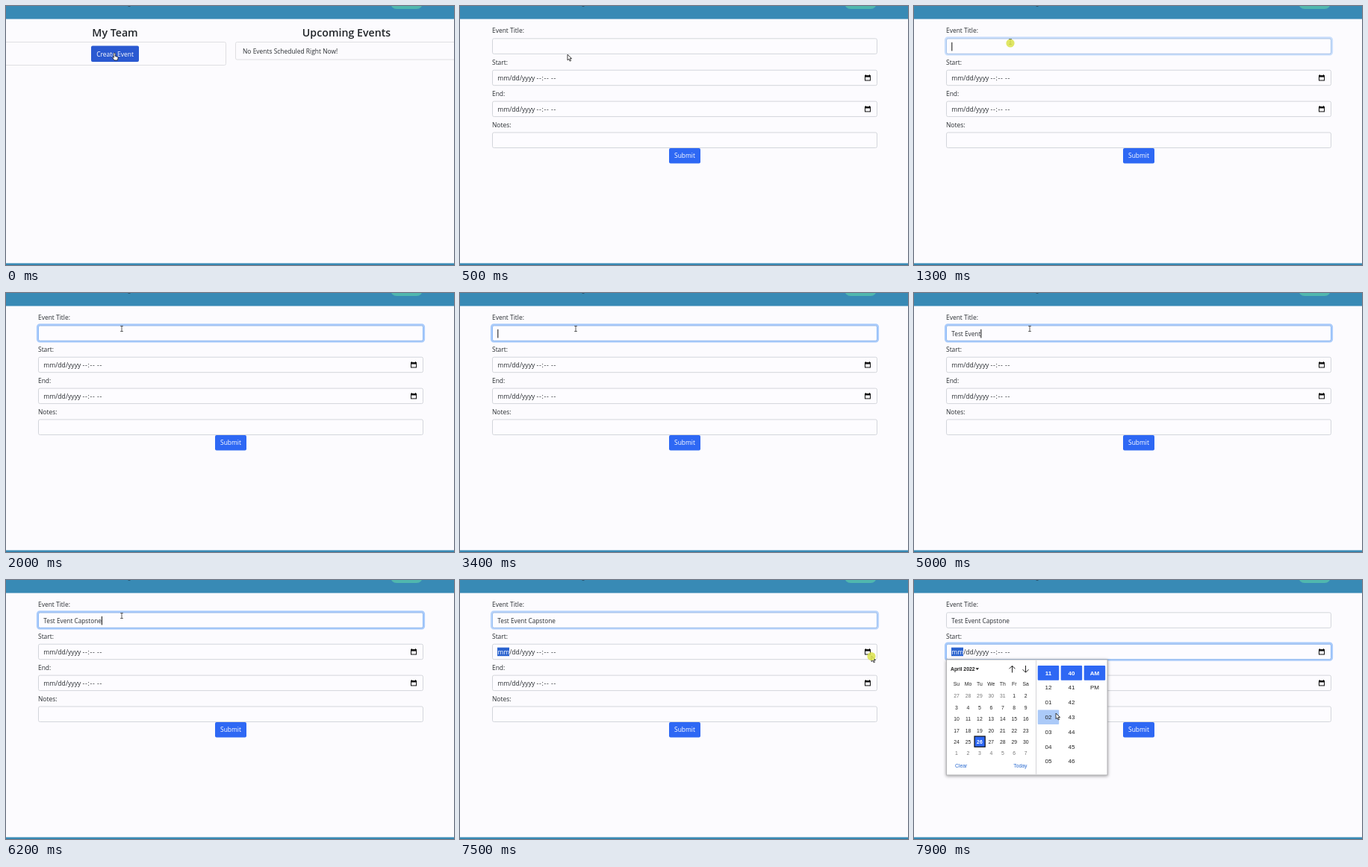
Recreate the animation shown at these times as an HTML page. Size 600 px wide and 348 px high, loop 8 s.

```html
<!DOCTYPE html>
<html lang="en">
<head>
<meta charset="utf-8">
<title>Create event</title>
<style>
  html, body { margin: 0; width: 100%; height: 100%; overflow: hidden; background: #fcfbfe; }
  svg { display: block; }
  text { font: 8.45px "Open Sans", "Noto Sans", sans-serif; fill: #2b2f33; white-space: pre; }
  .heading { font-size: 14.2px; font-weight: 600; fill: #212529; }
  .value { font-size: 8.28px; }
  .date { font-size: 8.6px; }
  .picker text { font: 6.8px "Liberation Sans", Arial, sans-serif; fill: #222; }
  .picker .time { font-size: 8px; }
  .picker .bold { font-weight: 700; }
  .picker .dim { fill: #777; }
  .picker .link { fill: #2a6bd0; }
  .picker .white, .white { fill: #fff; }
</style>
</head>
<body>
<svg id="stage" width="600" height="348" viewBox="0 0 600 348"></svg>
<script>
const LOOP = 8000, STEP = 100;
const TITLE = 'Test Event Capstone';
// Moment each character is typed, in tenths of a second
const KEYS = [40, 41, 43, 44, 45, 46, 47, 49, 49, 50, 52, 53, 55, 56, 57, 58, 60, 61, 62];
// Pointer path: time, x, y
const PATH = [[0, 146, 67], [400, 146, 67], [900, 136, 58], [1300, 129, 48], [1400, 129, 48],
  [1700, 155, 48], [6400, 155, 48], [6900, 400, 112], [7300, 551, 102], [7600, 551, 102],
  [7900, 190, 179], [8000, 190, 179]];
const BLUE = '#2e68f4';
const stage = document.getElementById('stage');

const between = (t, a, b) => t >= a && t < b;
const ramp = (t, a, b) => Math.min(1, Math.max(0, (t - a) / (b - a)));
const rect = (x, y, w, h, fill, more = '') =>
  `<rect x="${x}" y="${y}" width="${w}" height="${h}" fill="${fill}" ${more}/>`;
const text = (x, y, s, cls = '', anchor = 'start') =>
  `<text x="${x}" y="${y}" class="${cls}" text-anchor="${anchor}">${s}</text>`;
const line = (d, color = '#222', width = 1) =>
  `<path d="${d}" fill="none" stroke="${color}" stroke-width="${width}"/>`;

function pointerAt(t) {
  const i = PATH.findIndex(p => p[0] > t);
  const [a, b] = [PATH[i - 1], PATH[i]];
  const k = ramp(t, a[0], b[0]);
  return [a[1] + (b[1] - a[1]) * k, a[2] + (b[2] - a[2]) * k];
}

const chrome = () =>
  rect(0, 0, 600, 348, '#fcfbfe') + rect(0, 0, 600, 17.5, '#388ab5') +
  rect(515, -14, 43, 18, '#50b7ae', 'rx="8"') +
  line('M163 -.4Q165 .8 167 -.4', '#1d2c38') + rect(0, 345.6, 600, 2.4, '#388ab5');

const teamPage = () =>
  text(146, 41.3, 'My Team', 'heading', 'middle') +
  text(456, 41.3, 'Upcoming Events', 'heading', 'middle') +
  rect(-5, 48.5, 299.5, 31, 'none', 'rx="2" stroke="#dfdfe2"') +
  rect(307.5, 48.5, 300, 23.5, 'none', 'rx="2" stroke="#dfdfe2"') +
  rect(114, 53.5, 64, 21.5, '#2a59d1', 'rx="2"') +
  text(146, 67.5, 'Create Event', 'white', 'middle') +
  text(317, 63.7, 'No Events Scheduled Right Now!');

function field(y, label, focus) {
  return text(43, y - 7, label) +
    rect(42.2, y - .8, 517.6, 22.6, 'none', `rx="3" stroke="#a9cbfb" stroke-width="2.6" opacity="${focus}"`) +
    rect(43.5, y + .5, 515, 20.5, '#fdfcff', 'rx="2" stroke="#d3d6db"') +
    rect(43.5, y + .5, 515, 20.5, 'none', `rx="2" stroke="#8dbaf8" opacity="${focus}"`);
}

function dateValue(y, selected) {
  const b = y + 14.2;
  return (selected ? rect(50, y + 5, 16, 11.5, '#2b63cf') : '') +
    text(50.3, b, 'mm', selected ? 'date white' : 'date') + text(66.2, b, '/dd/yyyy', 'date') +
    `<g letter-spacing=".75">${text(102.5, b, '--:--', 'date')}${text(122, b, '--', 'date')}</g>` +
    rect(542.5, y + 8, 7, 6.3, 'none', 'stroke="#111"') +
    rect(542, y + 7.5, 8, 2.4, '#111') + rect(543, y + 6.5, 1, 2, '#111') + rect(548, y + 6.5, 1, 2, '#111');
}

function form(t) {
  const typed = TITLE.slice(0, KEYS.filter(k => k * 100 <= t).length);
  const picking = t >= 7500;
  const titleFocus = Math.min(ramp(t, 1150, 1400), 1 - ramp(t, 7450, 7700));
  return field(43.3, 'Event Title:', titleFocus) +
    field(85.7, 'Start:', ramp(t, 7500, 7700)) + field(127.6, 'End:', 0) + field(169.5, 'Notes:', 0) +
    `<text id="title" x="50.3" y="58" class="value">${typed}</text>` +
    dateValue(85.7, picking) + dateValue(127.6, false) +
    rect(280, 191, 42, 20.5, BLUE, 'rx="2"') + text(301, 204.4, 'Submit', 'white', 'middle');
}

function caretOn(t) {
  if (t < 1200 || t >= 7500) return false;
  return ![[1800, 2300], [2800, 3400], [3900, 4000], [6700, 7200]].some(([a, b]) => between(t, a, b));
}

function picker() {
  const dayX = i => 57 + 15.45 * i, dayY = i => 142.3 + 15.4 * i;
  let s = rect(43.5, 107, 215.5, 155, '#fff', 'stroke="#b5b5b8" style="filter:drop-shadow(0 1px 2px #0006)"') +
    text(49, 122, 'April 2022', 'bold') + '<path d="M82.5 118.3h4.6l-2.3 2.6z" fill="#222"/>' +
    line('M131.5 124.5v-9M127.5 119.3l4-4 4 4M149.5 115v9M145.5 120.2l4 4 4-4') +
    line('M163.5 108V261', '#d4d4d7');
  ['Su', 'Mo', 'Tu', 'We', 'Th', 'Fr', 'Sa'].forEach((d, i) => s += text(dayX(i), dayY(0), d, '', 'middle'));
  s += rect(81, 210, 14.2, 14.2, BLUE, 'stroke="#111" stroke-width="1.2"');
  for (let i = 0; i < 42; i++) {
    const n = i - 4, today = n === 26;
    const day = n < 1 ? n + 31 : n > 30 ? n - 30 : n;
    s += text(dayX(i % 7), dayY(1 + Math.floor(i / 7)) + .6, day,
      today ? 'bold white' : n === day ? '' : 'dim', 'middle');
  }
  s += text(55, 252.3, 'Clear', 'link') + text(151.5, 252.3, 'Today', 'link', 'end');
  const columns = [['11', '12', '01', '02', '03', '04', '05'], [40, 41, 42, 43, 44, 45, 46], ['AM', 'PM']];
  s += rect(165.7, 174.5, 28.5, 19.5, '#abcaf8', 'rx="1"');
  columns.forEach((items, c) => {
    const x = 165.7 + 31 * c;
    s += rect(x, 115, 28.5, 19.7, BLUE, 'rx="1"');
    items.forEach((v, r) => s += text(x + 14.2, 127.6 + 19.8 * r, v, r ? 'time' : 'time bold white', 'middle'));
  });
  return `<g class="picker">${s}</g>`;
}

function pointer(t) {
  const [x, y] = pointerAt(t);
  const inTitle = t >= 400 && between(y, 43, 65);
  const outline = 'fill="#fff" stroke="#111" stroke-width=".8" stroke-linejoin="round"';
  const shape = t < 400
    ? `<path d="M-1.6 -2.5q0-1.4 1-1.4t1 1.4v3l3 .8q.9.3.7 1.6l-.8 3h-4.3l-2.6-3.6q.4-1.4 2 0z" ${outline}/>`
    : inTitle ? line('M-1.8 -3.5h3.6M0 -3.5v7M-1.8 3.5h3.6', '#333', .8)
    : `<path d="M0 0v7.6l1.8-1.6 1.3 2.9 1.4-.6-1.3-2.8h2.4z" ${outline}/>`;
  const clicking = [[200, 400], [1200, 1400], [7500, 7700]].some(([a, b]) => between(t, a, b));
  return `<g transform="translate(${x} ${y})">${shape}` +
    (clicking ? `<circle cy="${inTitle ? 2 : .5}" r="5.6" fill="#dbe24c" opacity=".86"/>` : '') + '</g>';
}

function render(t) {
  const onForm = t >= 400;
  stage.innerHTML = chrome() + (onForm ? form(t) : teamPage()) + (t >= 7700 ? picker() : '') + pointer(t);
  if (onForm && caretOn(t)) {
    const title = document.getElementById('title');
    const x = 50.3 + title.getComputedTextLength();
    title.insertAdjacentHTML('afterend', rect(x, 48.8, 1, 11.6, '#111'));
  }
}

let shown = -1;
const start = performance.now();
function tick() {
  const t = Math.floor((performance.now() - start) % LOOP / STEP) * STEP;
  if (t !== shown) render(shown = t);
  requestAnimationFrame(tick);
}
tick();
</script>
</body>
</html>
```
